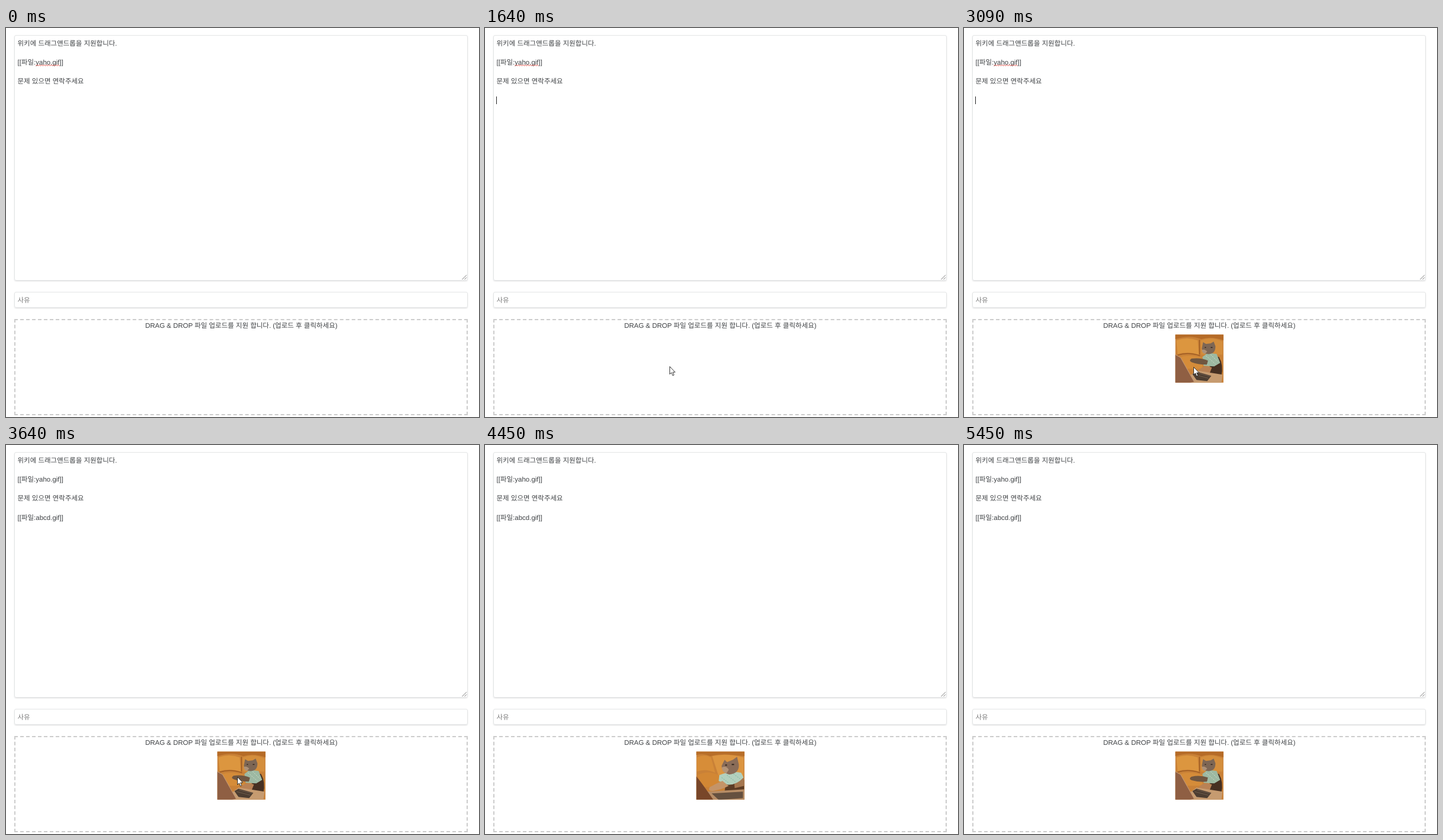
Write an HTML page that moves like this. It is 800 by 659 pixels and loops after 5.54 s.

```html
<!DOCTYPE html>
<html lang="ko">
<head>
<meta charset="utf-8">
<title>드래그앤드롭 업로드</title>
<style>
  html, body { margin: 0; width: 100%; height: 100%; overflow: hidden; background: #fff; }
  div, svg { position: absolute; box-sizing: border-box; }
  svg { left: 0; top: 0; }
  .field { left: 14px; width: 767px; border: 1px solid #e3e5e6; border-radius: 3px; box-shadow: 0 1px 2px #0002; }
  #editor { top: 12px; height: 416px; }
  #reason { top: 447px; height: 27px; }
  #drop { left: 14px; top: 493px; width: 767px; height: 163px; border: 2px dashed #ccc; }
  #drop.over { border: 4px dashed #555; }
  text { font: 11.5px "Liberation Sans", "Noto Sans CJK KR", "Noto Sans CJK", sans-serif; fill: #3f4245; text-rendering: geometricPrecision; }
</style>
</head>
<body>
<div class="field" id="editor"></div>
<div class="field" id="reason"></div>
<div id="drop"></div>
<svg width="800" height="659" viewBox="0 0 800 659">
  <defs>
    <linearGradient id="ice" x2="0" y2="1">
      <stop stop-color="#f4fcfd"/><stop offset="1" stop-color="#def2fd"/>
    </linearGradient>
    <filter id="shadow"><feDropShadow dx="1" dy="1.5" stdDeviation="1" flood-opacity=".4"/></filter>
    <filter id="soft"><feGaussianBlur stdDeviation=".6"/></filter>
    <clipPath id="frame"><path d="M0 0H81.5V81.5H0Z"/></clipPath>
  </defs>

  <text x="19.5" y="29.5">위키에 드래그앤드롭을 지원합니다.</text>
  <text x="19.5" y="62">[[파일:yaho.gif]]</text>
  <text x="19.5" y="94.3">문제 있으면 연락주세요</text>
  <text x="19.5" y="126.6" id="inserted">[[파일:abcd.gif]]</text>
  <path id="squiggle" fill="none" stroke="#e0483e"/>
  <path id="caret" d="M19.5 116V129" stroke="#222"/>
  <path d="M771.5 426L779 418.5M775.5 426L779 422.5" stroke="#666" stroke-width=".9"/>
  <text x="19.5" y="464.8" style="fill:#7c7c7c">사유</text>
  <text x="398" y="507.6" text-anchor="middle" id="hint">DRAG &amp; DROP 파일 업로드를 지원 합니다. (업로드 후 클릭하세요)</text>

  <g id="photo" transform="translate(357.3 519.3)" clip-path="url(#frame)">
    <path d="M0 0H82V82H0Z" fill="#c98137"/>
    <g id="wide" filter="url(#soft)">
      <path d="M0 0H82V10Q60 2 44 8Q25 0 0 8Z" fill="#b56b27"/>
      <path d="M2 10Q20 3 38 10L40 34Q20 28 4 33Z" fill="#dc963f"/>
      <path d="M43 10Q62 3 80 12V34H44Z" fill="#d48e3c"/>
      <path d="M2 40Q24 32 46 40V58H10Z" fill="#d58c39"/>
      <path d="M4 35Q22 29 42 36M41 9V34" fill="none" stroke="#9c5a22" stroke-width="1.5"/>
      <path d="M62 36L74 38Q82 52 78 70L56 66Z" fill="#463022"/>
      <path d="M46 38L55 31 70 33 76 48 66 54 48 53Z" fill="#9db9a2"/>
      <path d="M52 36L68 50M60 34L72 46M47 44L56 53" stroke="#d5e0cd" stroke-dasharray="2 2"/>
      <path d="M45 24L47 13 52 16 60 15 65 12 68 20Q68 32 58 33 47 34 45 24Z" fill="#7d6654"/>
      <path d="M45 26Q50 24 54 29L50 33Q45 31 45 26Z" fill="#ad9178"/>
      <path d="M50 22h2M60 22h3" stroke="#33261e" stroke-width="1.6"/>
      <path d="M40 60Q50 50 62 56L58 66H42Z" fill="#b98255"/>
      <path d="M22 72L36 61 80 68 78 82H22Z" fill="#c69b70"/>
      <path d="M29 67L36 63 61 70 54 79 36 77Z" fill="#4c3d31"/>
      <path d="M33 68L56 74M37 65L59 71" stroke="#8a7561" stroke-width=".6"/>
      <path d="M0 34L9 39 32 80 24 82H0Z" fill="#8f5f43"/>
      <path d="M0 34L9 39 32 80" fill="none" stroke="#c29a78"/>
      <path id="arm" d="M55 44Q42 40 27 44Q22 48 28 50Q40 53 54 51Z" fill="#705640"/>
    </g>
    <g id="close" filter="url(#soft)">
      <path d="M0 0H82V8Q40 2 24 8Q12 2 0 6Z" fill="#b76e29"/>
      <path d="M1 10Q14 4 25 10L32 36Q16 28 1 34Z" fill="#d78d38"/>
      <path d="M27 8Q50 2 80 10V42H38Z" fill="#dc9540"/>
      <path d="M2 40Q22 30 42 42V60H10Z" fill="#d28734"/>
      <path d="M50 52L81 48V68H48Z" fill="#5c3c25"/>
      <path d="M63 38Q82 34 82 58L65 62Z" fill="#a57750"/>
      <path d="M39 40Q58 32 76 36L80 44Q67 58 52 56L38 50Z" fill="#b3d0bd"/>
      <path d="M43 44L56 54M52 40L66 51M63 38L74 46" stroke="#77b49d" stroke-dasharray="2 2"/>
      <path d="M43 24L48 14 52 18 62 14 69 9 72 22Q73 37 56 39 43 36 43 24Z" fill="#8a6c58"/>
      <path d="M43 27Q51 23 55 31L51 37Q44 35 43 27Z" fill="#b59579"/>
      <path d="M49 23h3M60 22h4" stroke="#33261e" stroke-width="2"/>
      <path d="M18 68L82 64V82H24Z" fill="#b78d66"/>
      <path d="M26 71L79 68V79L38 82Z" fill="#65503f"/>
      <path id="paw" d="M44 50Q34 55 23 62Q20 69 29 68Q44 65 55 58Z" fill="#c49468"/>
      <path d="M0 42Q10 54 29 82H0Z" fill="#784629"/>
    </g>
  </g>

  <g id="pointer">
    <g id="dragged">
      <path d="M-97 -73h85v85h-85Z" fill="url(#ice)" filter="url(#shadow)"/>
      <path d="M-45.5 12.5h41v16h-41Z" fill="#fff" stroke="#8c8c8c"/>
      <path d="M-43 20.5h9M-38.5 16L-34 20.5-38.5 25" fill="none" stroke="#3558b0" stroke-width="1.2"/>
      <text x="-30" y="24" style="font-size:10.5px;fill:#24458f">이동</text>
    </g>
    <path d="M.5 .5V13.5L3.4 10.8 5.5 15.8 7.7 14.9 5.6 10.1H9.6Z" fill="#fff" stroke="#222" stroke-width=".9"/>
  </g>
</svg>
<script>
const LOOP = 5540, TICK = 90.9;
const el = id => document.getElementById(id);
const show = (id, on) => el(id).style.display = on ? '' : 'none';
const between = (n, from, to) => n >= from && n < to;

// Pointer stops: tick, x, y
const route = [[10, 194, 571], [11, 258, 573], [12, 312, 573], [22, 312, 573], [27, 357, 567],
  [31, 383, 585], [32, 388, 574], [35, 388, 574], [40, 391, 562], [47, 665, 672]];

let wave = 'M50.5 64';
for (let i = 0; i < 20; i++) wave += `l2 ${i % 2 ? 1.5 : -1.5}`;
el('squiggle').setAttribute('d', wave);

function pointerAt(n) {
  const i = route.findIndex(stop => stop[0] >= n);
  if (i < 1) return route[i < 0 ? route.length - 1 : 0].slice(1);
  const [a, x0, y0] = route[i - 1], [b, x1, y1] = route[i], k = (n - a) / (b - a);
  return [x0 + (x1 - x0) * k, y0 + (y1 - y0) * k];
}

function draw(t) {
  const n = Math.floor((t + 6) / TICK);
  const dragging = between(n, 10, 17), closeUp = between(n, 48, 54);
  el('drop').className = dragging ? 'over' : '';
  el('hint').setAttribute('y', dragging ? 510.1 : 507.6);
  show('dragged', dragging);
  show('caret', between(n, 18, 24) || between(n, 30, 35));
  show('inserted', n >= 35);
  show('squiggle', n < 35);
  show('photo', n >= 23);
  show('wide', !closeUp);
  show('close', closeUp);
  show('pointer', between(n, 10, 47));
  el('pointer').setAttribute('transform', `translate(${pointerAt(n).map(Math.round)})`);
  const swing = Math.sin(n * 2.1);
  el('arm').setAttribute('transform', `rotate(${swing * 9} 54 47)`);
  el('paw').setAttribute('transform', `rotate(${swing * 5} 50 54)`);
}

const start = performance.now();
(function tick() {
  draw((performance.now() - start) % LOOP);
  requestAnimationFrame(tick);
})();
</script>
</body>
</html>
```
